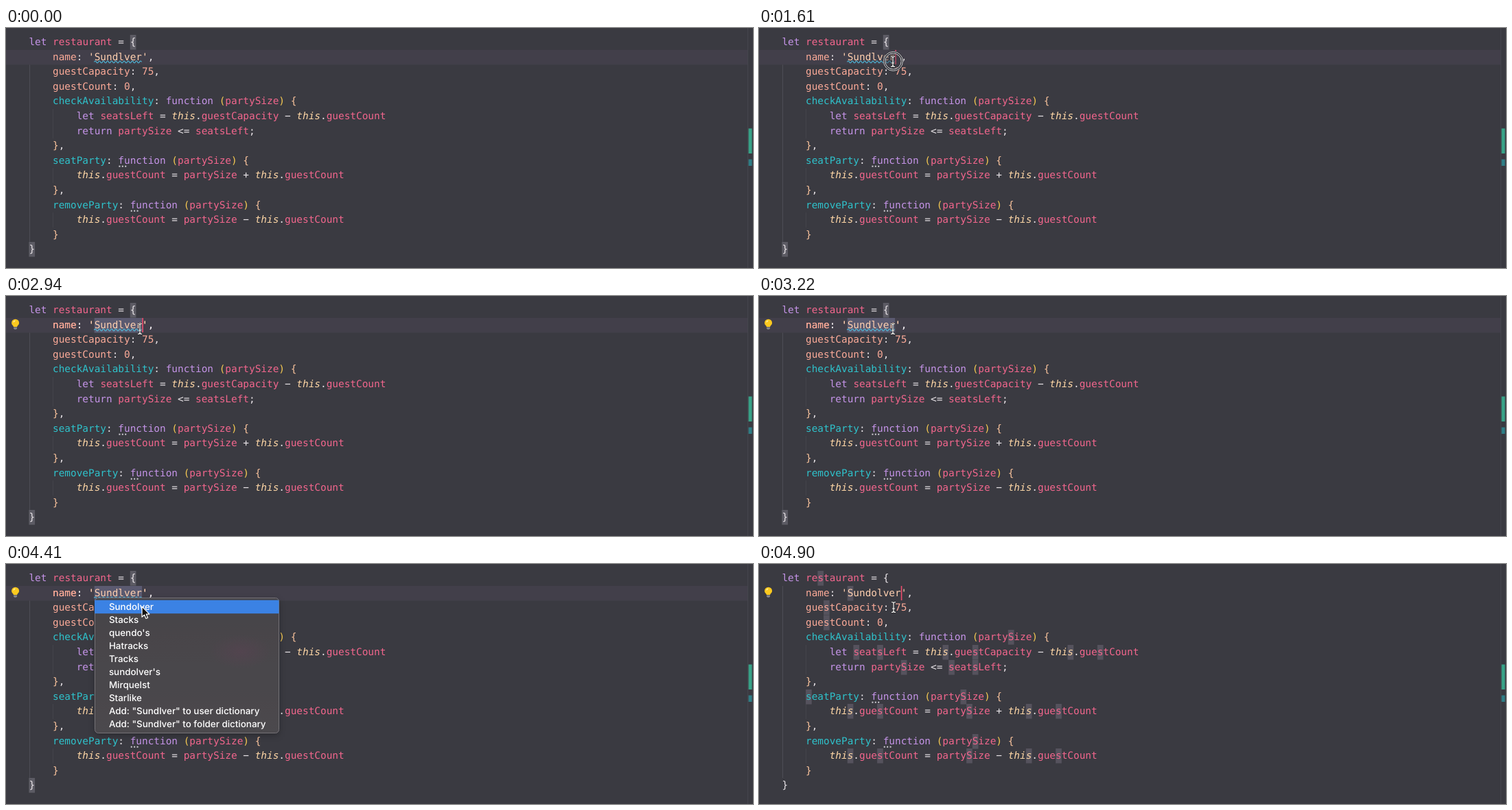
Recreate the animation shown at these times as an HTML page. Size 1088x350 px, loop 4.97 s.

```html
<!DOCTYPE html>
<html lang="en">
<head>
<meta charset="utf-8">
<title>Spelling fix in a code editor</title>
<style>
html, body { margin: 0; width: 100%; height: 100%; overflow: hidden; background: #3a3a41; }
svg { display: block; width: 1088px; height: 350px; }
text { white-space: pre; text-rendering: geometricPrecision; }
.code { font: 14.4px "DejaVu Sans Mono", "Liberation Mono", monospace; fill: #e9e4e8; }
.menu text { font: 500 13.4px Inter, Roboto, sans-serif; fill: #fff; }
.keyword { fill: #c594e8; }
.self { fill: #ffd7a6; font-style: italic; }
.number, .prop { fill: #fbaa98; }
.method { fill: #2fc2cb; }
.string { fill: #ffd0b0; }
.paren { fill: #f8cb52; }
.brace { fill: #f9c39c; }
.name { fill: #f2668d; }

.step { opacity: 0; animation: 4970ms step-end infinite; }
#before { animation-name: before; }
#after { animation-name: after; }
#picked { animation-name: picked; }
#caret { animation-name: caret; }
#bulb { animation-name: bulb; }
#menu { animation-name: menu; }
#ring { animation-name: ring; }
#arrow { animation-name: arrow; }
#beam { animation-name: beam; }
#pointer { animation: travel 4970ms ease-in-out infinite; }

@keyframes before { 0% { opacity: 1 } 92.95%, 100% { opacity: 0 } }
@keyframes after { 0% { opacity: 0 } 92.95%, 100% { opacity: 1 } }
@keyframes picked { 0% { opacity: 0 } 36.61% { opacity: 1 } 92.95%, 100% { opacity: 0 } }
@keyframes bulb { 0% { opacity: 0 } 42.25%, 100% { opacity: 1 } }
@keyframes menu { 0% { opacity: 0 } 67.6% { opacity: 1 } 92.95%, 100% { opacity: 0 } }
@keyframes ring { 0% { opacity: 0 } 29.57% { opacity: 1 } 35.21%, 100% { opacity: 0 } }
@keyframes caret {
  0% { opacity: 0 } 30.98% { opacity: 1 } 40.84% { opacity: 0 }
  50.7% { opacity: 1 } 60.56% { opacity: 0 }
  70.42% { opacity: 1 } 80.28%, 100% { opacity: 0 }
}
@keyframes arrow {
  0% { opacity: 0 } 12.67% { opacity: 1 } 21.12% { opacity: 0 }
  67.6% { opacity: 1 } 92.95%, 100% { opacity: 0 }
}
@keyframes beam {
  0% { opacity: 0 } 21.12% { opacity: 1 } 67.6% { opacity: 0 } 92.95%, 100% { opacity: 1 }
}
@keyframes travel {
  0%, 12.67% { transform: translate(262px, 110px) }
  18.3%, 19.7% { transform: translate(222px, 58px) }
  26.75%, 36.6% { transform: translate(195px, 49px) }
  50%, 67.6% { transform: translate(195px, 48px) }
  69%, 80.28% { transform: translate(196px, 47px) }
  87.3%, 92.95% { transform: translate(198px, 62px) }
  95%, 100% { transform: translate(196px, 63px) }
}
</style>
</head>
<body>
<svg viewBox="0 0 1088 350">
  <defs>
    <linearGradient id="glass" x2="0" y2="1">
      <stop offset="0" stop-color="#464449"/>
      <stop offset="1" stop-color="#4c484d"/>
    </linearGradient>
    <radialGradient id="tint">
      <stop offset="0" stop-color="#5b4253" stop-opacity=".5"/>
      <stop offset="1" stop-color="#5b4253" stop-opacity="0"/>
    </radialGradient>
    <filter id="shade" x="-10%" y="-10%" width="120%" height="125%">
      <feDropShadow dx="0" dy="3" stdDeviation="4" flood-opacity=".25"/>
    </filter>
  </defs>
  <rect width="1088" height="350" fill="#3a3a41"/>
  <g id="marks"></g>
  <path d="M1080.5 0V350" stroke="#45454d"/>
  <path d="M1081.5 146.500h5v36.500h-5z" fill="#38a388"/>
  <path d="M1081.5 191.500h5v9.500h-5z" fill="#2f7f87"/>

  <g id="before" class="step"></g>
  <g id="picked" class="step"></g>
  <g id="after" class="step"></g>
  <g id="page" class="code"></g>
  <rect id="caret" class="step" x="198.300" y="32" width="1.600" height="21" fill="#ee4d6e"/>

  <g id="bulb" class="step">
    <path d="M11 45c0-1.800-2.900-2.900-2.900-5.800a5.500 5.500 0 0 1 11 0c0 2.900-2.900 4-2.900 5.800z" fill="#fbc91f"/>
    <path d="M11 38.300q.5-1.800 2.300-2.100" fill="none" stroke="#fff3b8" stroke-width="1.200"/>
    <path d="M11.200 45.400h4.800v2.200l-1.200 1.200h-2.400L11.200 47.600z" fill="#85868b"/>
  </g>

  <g id="menu" class="step menu">
    <rect x="129.500" y="49.500" width="268" height="197" rx="5" fill="url(#glass)" stroke="#747277" filter="url(#shade)"/>
    <ellipse cx="342" cy="128" rx="45" ry="25" fill="url(#tint)"/>
    <rect x="129" y="52.700" width="268.500" height="19.500" fill="#3b82e4"/>
  </g>

  <g id="ring" class="step" fill="none">
    <circle cx="195.500" cy="48.500" r="13" fill="#3a3a41" fill-opacity=".4" stroke="#26262b" stroke-width="4"/>
    <circle cx="195.500" cy="48.500" r="14" stroke="#dedee2"/>
    <circle cx="195.500" cy="48.500" r="11.700" stroke="#dedee2"/>
  </g>
  <g id="pointer">
    <path id="arrow" class="step" d="M0 0V15.300L3.500 12.100 5.900 17.500 8.500 16.400 6.200 11.100H10.900Z"
      fill="#111" stroke="#fff" stroke-width="1.200" stroke-linejoin="round"/>
    <g id="beam" class="step" fill="none">
      <path d="M-3-7.500q3 0 3 2V5.500q0 2-3 2M3-7.500q-3 0-3 2M0 5.500q0 2 3 2M-2 2h4" stroke="#222" stroke-width="2.600"/>
      <path d="M-3-7.500q3 0 3 2V5.500q0 2-3 2M3-7.500q-3 0-3 2M0 5.500q0 2 3 2M-2 2h4" stroke="#fff" stroke-width="1.200"/>
    </g>
  </g>
</svg>
<script>
const LEFT = 33.4, TOP = 10, CELL = 8.668, ROW = 21.6;
const TYPO = "Sundlver", FIXED = "Sundolver";
const lines = `let restaurant = {
    name: '${TYPO}',
    guestCapacity: 75,
    guestCount: 0,
    checkAvailability: function (partySize) {
        let seatsLeft = this.guestCapacity − this.guestCount
        return partySize <= seatsLeft;
    },
    seatParty: function (partySize) {
        this.guestCount = partySize + this.guestCount
    },
    removeParty: function (partySize) {
        this.guestCount = partySize − this.guestCount
    }
}`.split("\n");
const fixedLine = lines[1].replace(TYPO, FIXED);

const $ = id => document.getElementById(id);
const colX = col => LEFT + col * CELL;
const rowY = row => TOP + Math.round(row * ROW);

function add(parent, tag, attrs, content) {
  const el = document.createElementNS("http://www.w3.org/2000/svg", tag);
  for (const key in attrs) el.setAttribute(key, attrs[key]);
  if (content) el.textContent = content;
  return parent.appendChild(el);
}

function block(parent, row, col, count, fill) {
  add(parent, "rect", { x: colX(col), y: rowY(row), width: count * CELL, height: ROW, fill });
}

function kind(token, rest, row) {
  if (/^(let|function|return)$/.test(token)) return "keyword";
  if (token === "this") return "self";
  if (/^\d/.test(token)) return "number";
  if (token[0] === "'") return "string";
  if (/[()]/.test(token)) return "paren";
  if (/[{}]/.test(token)) return row % 14 ? "brace" : "";
  if (!/^\w/.test(token)) return "";
  if (rest.startsWith(": function")) return "method";
  return rest[0] === ":" ? "prop" : "name";
}

function write(parent, line, row) {
  const text = add(parent, "text", { class: "code", x: LEFT, y: rowY(row) + 15 });
  for (const m of line.matchAll(/\w+|'\w+'|[(){}]|[^\w'(){}]+/g)) {
    const rest = line.slice(m.index + m[0].length);
    add(text, "tspan", { class: kind(m[0], rest, row) }, m[0]);
  }
}

// Indent guides
add($("marks"), "path", { d: `M34.500 ${rowY(1)}V${rowY(14)}`, stroke: "#4d4d55" });
for (const [from, to] of [[5, 7], [9, 10], [12, 13]])
  add($("marks"), "path", { d: `M68.500 ${rowY(from)}V${rowY(to)}`, stroke: "#43434a" });

lines.forEach((line, row) => {
  if (row !== 1) write($("page"), line, row);
});

// Current line, matching braces and the misspelt word
add($("before"), "rect", { y: rowY(1), width: 1080, height: ROW, fill: "#423f4a" });
block($("before"), 0, 17, 1, "#5c5b64");
block($("before"), 14, 0, 1, "#5c5b64");
block($("picked"), 1, 11, TYPO.length, "#5b5a70");
write($("before"), lines[1], 1);
write($("picked"), lines[1], 1);
const wave = "M128.500 49.500q1.500-3 3 0" + "t3 0".repeat(22);
for (const id of ["before", "picked"])
  add($(id), "path", { d: wave, fill: "none", stroke: "#4fc0e2", "stroke-width": 1.2 });

// Every matching letter lights up after the fix
lines.forEach((line, row) => {
  for (const m of (row === 1 ? fixedLine : line).matchAll(/s/gi))
    block($("after"), row, m.index, 1, "#55525d");
});
write($("after"), fixedLine, 1);
add($("after"), "rect", { x: colX(20), y: 32, width: 1.6, height: 21, fill: "#ee4d6e" });

// Hint dots below two function keywords
for (const [row, col] of [[8, 15], [11, 17]])
  for (let i = 0; i < 3; i++)
    add($("page"), "rect", { x: colX(col) + 1 + i * 4.4, y: rowY(row) + 17.7, width: 2, height: 2, fill: "#d2d0d6" });

[FIXED, "Stacks", "quendo's", "Hatracks", "Tracks", FIXED.toLowerCase() + "'s", "Mirquelst", "Starlike",
  `Add: "${TYPO}" to user dictionary`, `Add: "${TYPO}" to folder dictionary`
].forEach((label, i) => add($("menu"), "text", { x: 149.9, y: 66.8 + i * 19 }, label));
</script>
</body>
</html>
```
